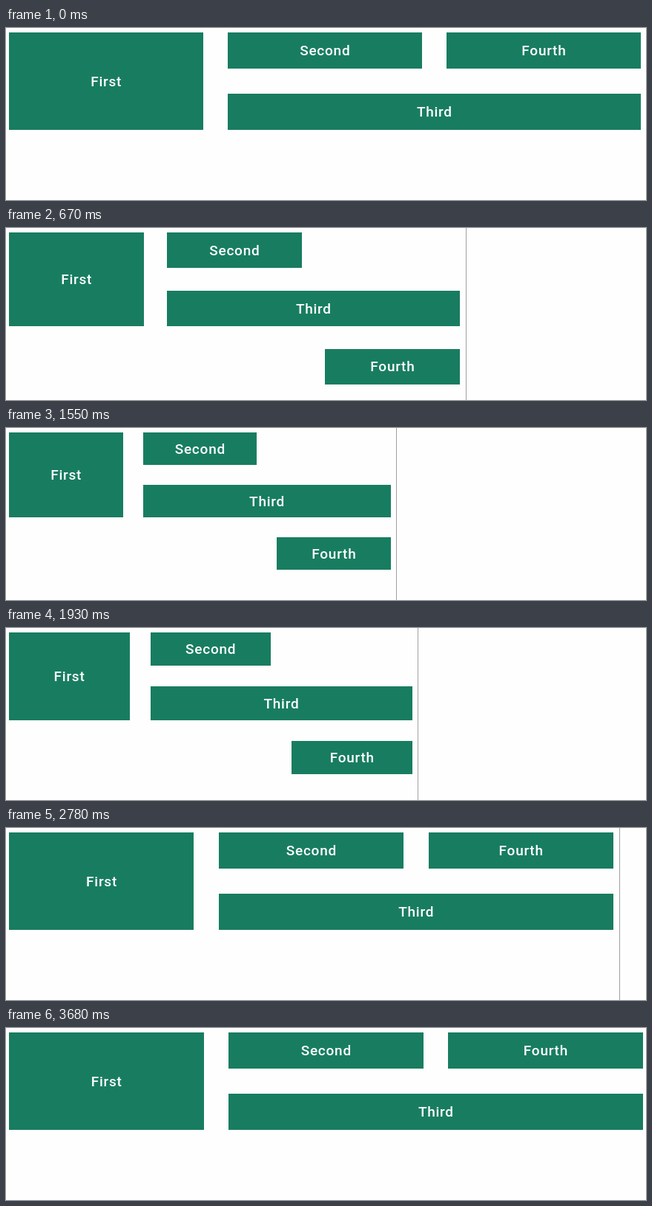
Animation of 863x233 px, one loop 5.15 s. Source, as an HTML page:

```html
<!DOCTYPE html>
<html lang="en">
<head>
<meta charset="utf-8">
<title>Responsive grid</title>
<style>
  html, body { margin: 0; width: 100%; height: 100%; overflow: hidden; background: #fefefe; }
  svg { display: block; }
  rect { fill: #187d60; shape-rendering: crispEdges; }
  #edge { fill: #a0a0a0; }
  text { font: 500 19px Roboto, "Liberation Sans", sans-serif; letter-spacing: 0.75px; fill: #fff; text-anchor: middle; }
</style>
</head>
<body>
<svg id="stage" width="863" height="233" viewBox="0 0 863 233">
  <rect id="edge" y="0" width="1" height="233"/>
</svg>
<script>
const LOOP = 5150, LEFT = 4, TOP = 6.1;
const WIDE = 797;    // from this width on, Fourth fills the free cell of the first row
const FLUID = 662.9; // below this width, gaps and padding shrink

// Dragging the window edge: [time in ms, window width]
const drag = [
  [110, 864], [350, 756], [610, 642], [970, 538], [1550, 526], [1750, 524],
  [2220, 663], [2310, 702], [2780, 827], [3370, 855], [3410, 864], [3680, 867]
];

const stage = document.getElementById("stage");
const edge = document.getElementById("edge");

function add(tag, content = "") {
  const node = document.createElementNS("http://www.w3.org/2000/svg", tag);
  node.textContent = content;
  return stage.appendChild(node);
}

const boxes = ["First", "Second", "Third", "Fourth"].map(name => ({
  rect: add("rect"), label: add("text", name)
}));

function set(node, attrs) {
  for (const name in attrs) node.setAttribute(name, attrs[name]);
}

// Monotone cubic interpolation through the drag points
const rate = i => (drag[i + 1][1] - drag[i][1]) / (drag[i + 1][0] - drag[i][0]);
const last = drag.length - 1;
const slopes = drag.map((_, i) => {
  if (i === 0 || i === last) return 0;
  const a = rate(i - 1), b = rate(i);
  return a * b > 0 ? 2 * a * b / (a + b) : 0;
});

function widthAt(time) {
  const t = Math.min(Math.max(time, drag[0][0]), drag[last][0]);
  let i = 0;
  while (i < last - 1 && t >= drag[i + 1][0]) i++;
  const [t0, w0] = drag[i], [t1, w1] = drag[i + 1];
  const d = t1 - t0, u = (t - t0) / d, v = 1 - u;
  return v * v * (1 + 2 * u) * w0 + u * u * (1 + 2 * v) * w1
    + u * v * d * (v * slopes[i] - u * slopes[i + 1]);
}

function place(box, x0, y0, x1, y1) {
  const [left, top, right, bottom] = [x0, y0, x1, y1].map(Math.round);
  set(box.rect, { x: left, y: top, width: right - left, height: bottom - top });
  set(box.label, { x: (x0 + x1) / 2 + 0.3, y: Math.round((y0 + y1) / 2 + 6.7) });
}

function draw(time) {
  const w = widthAt(time % LOOP);
  const shrink = Math.max(0, FLUID - w);
  const gap = 33.35 - 0.049 * shrink;
  const high = 49.25 - 0.037 * shrink;
  const right = w - 8 + 0.0077 * shrink;
  const col = (right - LEFT - 2 * gap) / 3;

  const cell = (box, c, r, cols = 1, rows = 1) => {
    const x = LEFT + c * (col + gap), y = TOP + r * (high + gap);
    place(box, x, y, x + cols * (col + gap) - gap, y + rows * (high + gap) - gap);
  };
  const [first, second, third, fourth] = boxes;
  cell(first, 0, 0, 1, 2);
  cell(second, 1, 0);
  cell(third, 1, 1, 2);
  cell(fourth, 2, w >= WIDE ? 0 : 2);
  set(edge, { x: Math.round(w) });
}

const start = performance.now();
function tick() {
  draw(performance.now() - start);
  requestAnimationFrame(tick);
}
tick();
</script>
</body>
</html>
```
